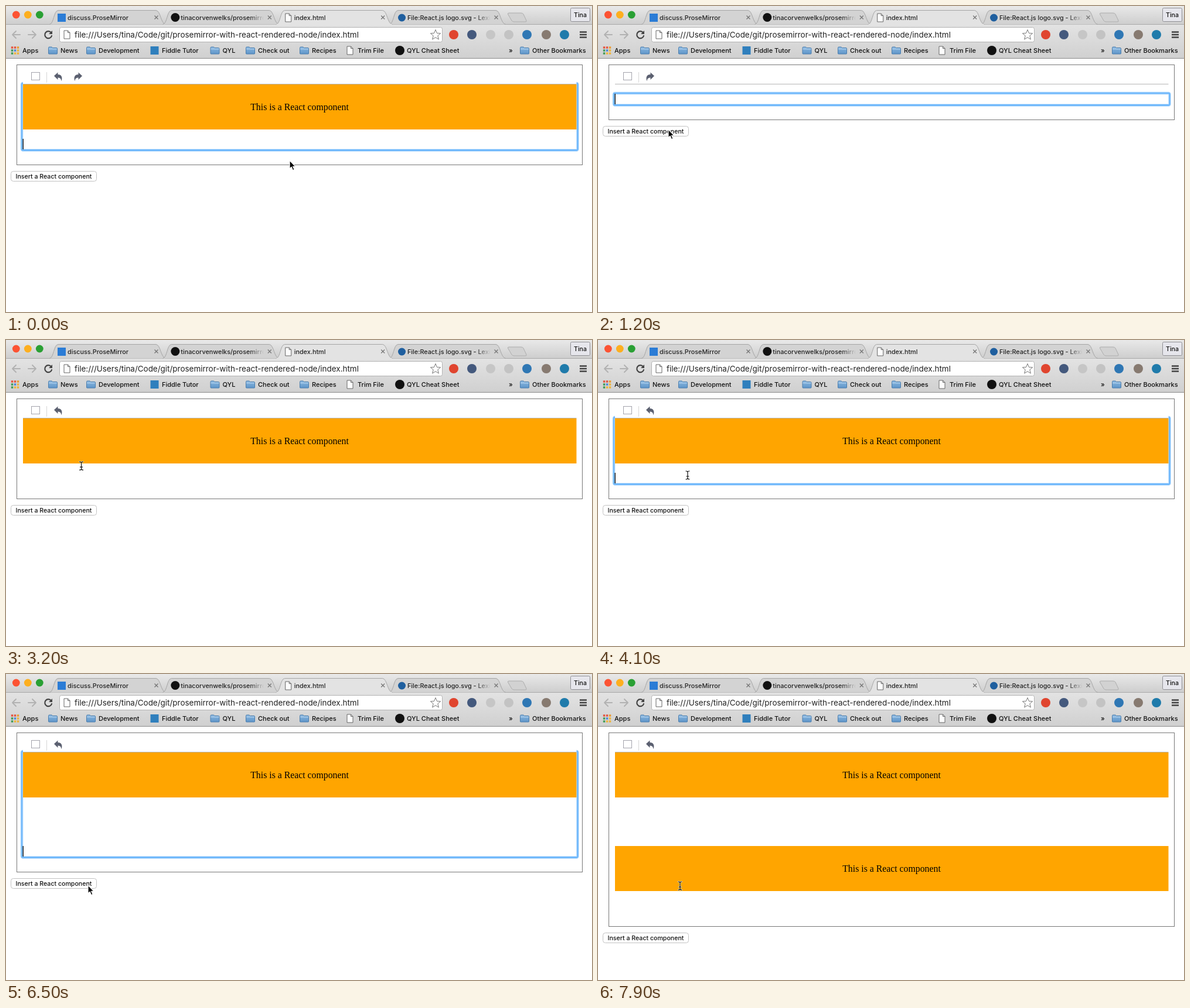
Write an HTML page that moves like this. It is 1000 px wide and 523 px high and loops after 8 s.

```html
<!DOCTYPE html>
<html lang="en">
<head>
<meta charset="utf-8">
<title>Editor demo</title>
<style>
  html, body { margin: 0; width: 100%; height: 100%; overflow: hidden; background: #fff; }
  svg { display: block; width: 100%; height: 100%; }
  text { font: 500 11px Inter, "Open Sans", sans-serif; fill: #111; white-space: pre; }
  .tab text { font-size: 10.8px; fill: url(#fade); }
  .url { font-size: 13.46px; font-weight: 400; fill: #222; }
  .label { font-size: 10.6px; text-anchor: middle; }
  .serif { font: 15.8px "Liberation Serif", "Times New Roman", serif; fill: #000; text-anchor: middle; }
  .line { fill: none; stroke-linecap: round; stroke-linejoin: round; }
</style>
</head>
<body>
<svg viewBox="0 0 1000 523" preserveAspectRatio="none">
  <defs>
    <linearGradient id="strip" x2="0" y2="1"><stop stop-color="#e9e9e9"/><stop offset="1" stop-color="#cdcdcd"/></linearGradient>
    <linearGradient id="bar" x2="0" y2="1"><stop stop-color="#e3e3e3"/><stop offset="1" stop-color="#d0d0d0"/></linearGradient>
    <linearGradient id="blue" x2="0" y2="1"><stop stop-color="#56a5fb"/><stop offset="1" stop-color="#1a72f2"/></linearGradient>
    <linearGradient id="dir" x2="0" y2="1"><stop stop-color="#8fbbe2"/><stop offset="1" stop-color="#5d94c8"/></linearGradient>
    <linearGradient id="fade" gradientUnits="userSpaceOnUse" x1="148" x2="173"><stop stop-color="#222"/><stop offset="1" stop-color="#222" stop-opacity="0"/></linearGradient>
    <g id="page"><path d="M-5-7H1.5L5-3.5V7H-5Z" fill="#fdfdfd" stroke="#666"/><path d="M1.5-7V-3.5H5" fill="none" stroke="#666"/></g>
    <g id="folder"><path d="M-7.5-4.5q0-1.5 1.5-1.5H-2l1.5 1.5H6q1.5 0 1.5 1.5V5q0 1-1 1H-6.5q-1 0-1-1Z" fill="url(#dir)" stroke="#4a7dad"/><path d="M-7-2.5H7" stroke="#b9d6f0"/></g>
    <path id="back" d="M7 0H-6M0-6L-6 0L0 6" class="line" stroke-width="2"/>
    <path id="undo" d="M-7-1.5L-.5-7.5V-4C5.5-4 8 .5 5.5 7.5C5 3.5 3.5 1.5-.5 1.5V5Z" fill="#5b6070"/>
    <path id="stem" d="M-3-7Q0-7 0-5Q0-7 3-7M0-5V5M-3 7Q0 7 0 5Q0 7 3 7M-2 2H2" class="line"/>
    <circle id="circle" cx=".5" cy="1" r="20.8" fill="none"/>
    <g id="component"><path d="M29 134H973.5V211H29Z" fill="#ffa500"/><text class="serif" x="501" y="178">This is a React component</text></g>
  </defs>

  <rect width="1000" height="32" fill="url(#strip)"/>
  <circle cx="17.3" cy="15" r="6.4" fill="#fc5333"/>
  <circle cx="37.3" cy="15" r="6.4" fill="#fdaf1f"/>
  <circle cx="57.3" cy="15" r="6.4" fill="#2aa034"/>
  <path d="M858 12H879q3 0 4 2L888 25q1 2-2 2H867q-3 0-4-2L856.5 14q-.5-2 1.5-2Z" fill="#d2d2d2" stroke="#adadad"/>
  <rect x="963.5" y="3.5" width="33" height="23" rx="2" fill="#e6e6ec" stroke="#8f8f94"/>
  <text class="label" x="980" y="19">Tina</text>
  <rect y="31" width="1000" height="58" fill="url(#bar)"/>
  <path d="M0 31.5H1000" stroke="#a9a9a9"/>
  <path d="M0 89.5H1000" stroke="#8c8c8c"/>
  <g id="tabs"></g>

  <use href="#back" x="17" y="49" stroke="#b2b2b2"/>
  <use href="#back" transform="translate(45 49) scale(-1 1)" stroke="#b2b2b2"/>
  <path d="M77 45.5A6 6 0 1 0 78 51" class="line" stroke="#444" stroke-width="2.2"/>
  <path d="M79 42V48H73Z" fill="#444"/>
  <rect x="91.5" y="36.5" width="653" height="25" rx="3" fill="#fff" stroke="#b3b3b3"/>
  <use href="#page" x="104" y="49"/>
  <text class="url" x="117" y="54">file:///Users/tina/Code/git/prosemirror-with-react-rendered-node/index.html</text>
  <path d="M733 40.5L735.4 46.4L741.6 46.8L736.8 50.8L738.4 57L733 53.6L727.6 57L729.2 50.8L724.4 46.8L730.6 46.4Z" fill="#fff" stroke="#777"/>
  <path d="M979 44.5H991M979 49H991M979 53.5H991" stroke="#444" stroke-width="2.6"/>
  <g id="marks"></g>

  <rect id="frame" x="18.5" y="100.5" width="965" fill="#fff" stroke="#777"/>
  <g id="ring" fill="none" stroke="#72b9fb">
    <rect x="27" width="948.5" rx="2" stroke-width="5" opacity=".35"/>
    <rect x="27" width="948.5" rx="2" stroke-width="2.8"/>
  </g>
  <path d="M29 110H973.5V134H29Z" fill="#fff"/>
  <path d="M29 133.5H973.5" stroke="#b5b5b5"/>
  <rect x="43.5" y="113.5" width="14" height="13" fill="#fff" stroke="#a4a4ac"/>
  <path d="M69.5 113V131" stroke="#d5d5d5"/>
  <use id="undoIcon" href="#undo" x="89" y="121"/>
  <use id="redoIcon" href="#undo"/>
  <use id="first" href="#component"/>
  <use id="second" href="#component" y="160"/>
  <path id="caret" d="M29.2 0V18" stroke="#000" stroke-width="1.3"/>

  <g id="button">
    <rect id="face" x="8.5" y=".5" width="146" height="17" rx="4"/>
    <text class="label" x="81.5" y="13">Insert a React component</text>
  </g>
  <g id="pointer">
    <g id="halo">
      <use href="#circle" stroke="#fff" stroke-width="5"/>
      <use href="#circle" stroke="#000" stroke-width="2.8"/>
    </g>
    <path id="arrow" d="M0 0V14L3.2 11.2L5.5 16.7L8 15.6L5.7 10.3H10Z" stroke="#fff" stroke-width="1.2"/>
    <g id="beam">
      <use href="#stem" stroke="#fff" stroke-width="2.6" opacity=".7"/>
      <use href="#stem" stroke="#111" stroke-width="1.2"/>
    </g>
  </g>
</svg>
<script>
const $ = id => document.getElementById(id);
const show = (id, on) => $(id).style.display = on ? '' : 'none';
const dot = (x, y, r, color) => `<circle cx="${x}" cy="${y}" r="${r}" fill="${color}"/>`;
const box = (x, y, s, color) => `<rect x="${x - s / 2}" y="${y - s / 2}" width="${s}" height="${s}" fill="${color}"/>`;
const icon = (name, x, y) => `<use href="#${name}" x="${x}" y="${y}"/>`;

// Tabs, the active one last so that it covers its neighbours
const tabs = [
  [0, 'discuss.ProseMirror', box(21, 20, 14, '#2b7cd6')],
  [1, 'tinacorvenwelks/prosemirror', dot(21.5, 19.5, 7.5, '#111')],
  [3, 'File:React.js logo.svg - Lexidomo', dot(21.5, 20, 6.5, '#1f5f9f')],
  [2, 'index.html', icon('page', 21, 20)]
];
$('tabs').innerHTML = tabs.map(([i, title, mark]) => {
  const on = i === 2;
  return `<g class="tab" transform="translate(${74 + 193.33 * i})">
    <path d="M0 31.5C8 31 7 8 15 7.5H182C190 8 190 31 199 31.5" fill="${on ? '#e3e3e3' : '#d3d3d3'}" stroke="#a6a6a6"/>
    ${on ? '<path d="M1 31.5H198" stroke="#e3e3e3" stroke-width="2"/>' : ''}
    ${mark}<text x="31" y="24">${title}</text>
    <path d="M179.5 16.5l6 6m0-6l-6 6" stroke="#777" stroke-width="1.3"/></g>`;
}).join('');

// Extension buttons and bookmarks
const extensions = [[764, '#e0452f'], [795, '#44597d'], [827, '#c6c6c6'], [858, '#c3c3c3'],
  [889, '#2f77b4'], [922, '#877a70'], [953, '#1f7bab']];
const bookmarks = [[28, 'Apps'], [93, 'News', 'folder'], [158, 'Development', 'folder'], [266, 'Fiddle Tutor'],
  [369.5, 'QYL', 'folder'], [430, 'Check out', 'folder'], [522, 'Recipes', 'folder'], [600, 'Trim File', 'page'],
  [684, 'QYL Cheat Sheet'], [858, '»'], [898, 'Other Bookmarks', 'folder']];
const grid = ['#e5533d', '#e5533d', '#eb9a2d', '#3f9c55', '#4a86dc', '#eeb53a', '#3f9c55', '#eeb53a', '#eeb53a'];
$('marks').innerHTML =
  extensions.map(([x, color]) => dot(x, 49, 8, color)).join('') +
  grid.map((color, i) => box(10.5 + i % 3 * 5, 71 + (i / 3 | 0) * 5, 3.4, color)).join('') +
  box(253.5, 76, 14, '#2f7fbd') + dot(672, 76, 8, '#111') +
  bookmarks.map(([x, name, kind]) =>
    (kind ? icon(kind, x - 13, 76) : '') + `<text x="${x}" y="80">${name}</text>`).join('');

// [time, value] steps, then the pointer's path as [time, x, y]
const bottoms = [[0, 271], [800, 194], [3000, 271], [4700, 305], [5100, 338], [7200, 431]];
const blinks = [[0, 0], [800, 800], [3700, 3700], [4700, 4700], [5100, 5100]];
const path = [[100, 484, 264], [500, 89, 120], [800, 89, 120], [1150, 120, 211], [3050, 120, 211],
  [3500, 153, 227], [3800, 153, 227], [4000, 153, 231], [5300, 153, 231], [5800, 160, 384],
  [6000, 160, 384], [6300, 140, 361], [7200, 140, 361], [7500, 140, 362]];
const clicks = [[600, 800], [2700, 3000], [3600, 3800], [6900, 7200]];

const within = (t, a, b) => t >= a && t < b;
const step = (list, t) => list.findLast(([at]) => at <= t)[1];
const place = (id, x, y) => $(id).setAttribute('transform', `translate(${x} ${y})`);

function pointerAt(t) {
  const i = path.findIndex(([at]) => at > t);
  if (i < 0) return path.at(-1).slice(1);
  if (!i) return path[0].slice(1);
  const [t0, x0, y0] = path[i - 1], [t1, x1, y1] = path[i];
  const p = (t - t0) / (t1 - t0), k = p * p * (3 - 2 * p);
  return [x0 + (x1 - x0) * k, y0 + (y1 - y0) * k];
}

function draw(t) {
  const bottom = step(bottoms, t);
  const undone = within(t, 800, 3000);
  const pressed = within(t, 2700, 3000) || within(t, 6900, 7200);
  const focused = !within(t, 2700, 3700) && t < 6900;

  $('frame').setAttribute('height', bottom - 100);
  const top = undone ? 149 : 132;
  for (const r of $('ring').children) {
    r.setAttribute('y', top);
    r.setAttribute('height', bottom - 24.5 - top);
  }
  show('ring', focused);
  show('first', !undone);
  show('second', t >= 7200);
  show('undoIcon', !undone);
  show('redoIcon', t < 3000);
  $('redoIcon').setAttribute('transform', `translate(${undone ? 89 : 123} 121) scale(-1 1)`);

  const lit = (t - step(blinks, t)) % 1000 < 500;
  show('caret', focused ? lit : pressed);
  place('caret', 0, bottom - 44);
  place('button', 0, bottom + 11);
  $('face').setAttribute('fill', pressed ? 'url(#blue)' : '#fff');
  $('face').setAttribute('stroke', pressed ? '#3b86e8' : '#c2c2c2');

  const [x, y] = pointerAt(t);
  const inside = y > 134 && y < bottom - 24;
  place('pointer', x, y);
  show('pointer', !within(t, 4600, 5400));
  show('arrow', !inside);
  show('beam', inside);
  show('halo', clicks.some(([a, b]) => within(t, a, b)));
}

function tick() {
  draw(Math.floor(performance.now() % 8000 / 100) * 100);
  requestAnimationFrame(tick);
}
tick();
</script>
</body>
</html>
```
